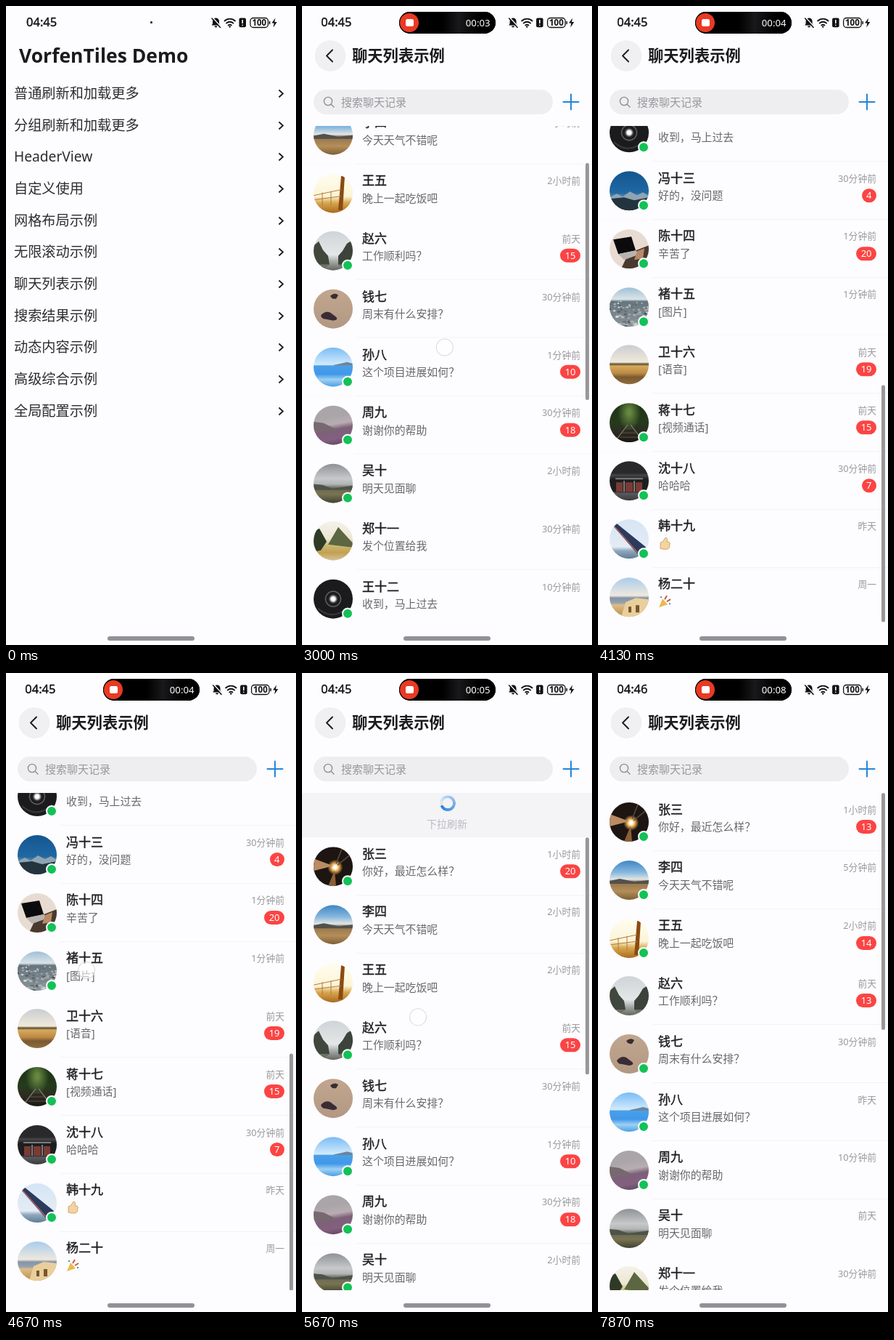
Animation of 400x879 px, one loop 8 s. Source, as an HTML page:

```html
<!DOCTYPE html>
<html lang="zh-CN">
<head>
<meta charset="utf-8">
<title>Chat list</title>
<style>
html, body { margin: 0; width: 100%; height: 100%; overflow: hidden; background: #fdfcfe; }
body { font-family: "Noto Sans", "Noto Sans CJK SC", "Noto Sans CJK", sans-serif; }
div { position: absolute; box-sizing: border-box; }
svg { position: absolute; left: 0; top: 0; overflow: visible; }
#stage { width: 400px; height: 879px; overflow: hidden; background: #fdfcfe; }
.fill { inset: 0; }
.text { line-height: 30px; white-space: nowrap; }
.mid { -webkit-text-stroke: .4px; }
.row { left: 0; width: 400px; height: 80px; background: #fdfcfe; }
.line { left: 75px; right: 0; bottom: 0; height: 1px; background: #f3f2f5; }
.row:last-child .line { display: none; }
.face { left: 16px; top: 13px; width: 54px; height: 54px; border-radius: 50%; overflow: hidden; }
.online { left: 55px; top: 52px; width: 16px; height: 16px; border-radius: 50%; background: #12c257; border: 2px solid #fff; }
.badge { right: 16px; top: 37px; height: 19px; padding: 0 6.5px; border-radius: 10px; background: #fb4444; color: #fff; font-size: 13px; line-height: 19px; }
.spin { left: 189.5px; width: 22px; height: 22px; border-radius: 50%; -webkit-mask: radial-gradient(circle, #0000 6.6px, #000 7.4px); mask: radial-gradient(circle, #0000 6.6px, #000 7.4px); }
.touch { width: 24px; height: 24px; margin: -12px; border-radius: 50%; background: #ffffff99; border: 1.5px solid #b8b8be88; }
</style>
</head>
<body>
<div id="stage"></div>
<script>
const LOOP = 8000, PUSH = 1316, LOADED = 2130, RELEASE = 5800, REFRESHED = 6780;
const TOP = 165, VIEW = 684, PITCH = 79.8;

const menu = ['普通刷新和加载更多', '分组刷新和加载更多', 'HeaderView', '自定义使用', '网格布局示例', '无限滚动示例',
  '聊天列表示例', '搜索结果示例', '动态内容示例', '高级综合示例', '全局配置示例'];

const thumb = '<svg width="18" height="18" style="top:6px"><path d="M3 8l3-1 4-6q4 0 2 6h3q2 1 1 4 0 5-3 6H7l-4-1z" fill="#f3d3a0" stroke="#c79a5c" stroke-width=".8"/></svg>';
const party = '<svg width="18" height="18" style="top:6px"><path d="M1 17L6 5l7 8z" fill="#edb94f"/><path d="M9 6l3-5M12 9l5-3" stroke="#c4593f" stroke-width="2"/><path d="M3 3h2M15 12h2" stroke="#4b86c9" stroke-width="2"/></svg>';

// name, message, then time / unread / online before and after the refresh
const chats = [
  ['张三', '你好，最近怎么样？', ['1小时前', 20, 1], ['1小时前', 13, 1]],
  ['李四', '今天天气不错呢', ['2小时前', 0, 0], ['5分钟前', 0, 1]],
  ['王五', '晚上一起吃饭吧', ['2小时前', 0, 0], ['2小时前', 14, 1]],
  ['赵六', '工作顺利吗？', ['前天', 15, 1], ['前天', 13, 0]],
  ['钱七', '周末有什么安排？', ['30分钟前', 0, 0], ['30分钟前', 0, 1]],
  ['孙八', '这个项目进展如何？', ['1分钟前', 10, 1], ['昨天', 0, 1]],
  ['周九', '谢谢你的帮助', ['30分钟前', 18, 1], ['10分钟前', 0, 1]],
  ['吴十', '明天见面聊', ['2小时前', 0, 1], ['前天', 0, 0]],
  ['郑十一', '发个位置给我', ['30分钟前', 0, 0]],
  ['王十二', '收到，马上过去', ['10分钟前', 0, 1]],
  ['冯十三', '好的，没问题', ['30分钟前', 4, 1]],
  ['陈十四', '辛苦了', ['1分钟前', 20, 1]],
  ['褚十五', '[图片]', ['1分钟前', 0, 1]],
  ['卫十六', '[语音]', ['前天', 19, 0]],
  ['蒋十七', '[视频通话]', ['前天', 15, 1]],
  ['沈十八', '哈哈哈', ['30分钟前', 7, 1]],
  ['韩十九', thumb, ['昨天', 0, 1]],
  ['杨二十', party, ['周一', 0, 0]]
];

const area = (color, d) => `<path d="${d}" fill="${color}"/>`;
const stroke = (color, width, d) => `<path d="${d}" stroke="${color}" stroke-width="${width}" fill="none"/>`;

function pebbles() {
  let seed = 7, out = '';
  const rnd = () => (seed = seed * 16807 % 2147483647) / 2147483647;
  for (let i = 0; i < 90; i++) {
    const y = 19 + 35 * rnd(), tone = 70 + 150 * rnd() | 0;
    out += `<ellipse cx="${54 * rnd()}" cy="${y}" rx="${y / 16}" ry="${y / 26}" fill="rgb(${tone},${tone + 6},${tone + 10})"/>`;
  }
  return out;
}

// avatar scenes: backdrop, shapes in a 54 x 54 box
const faces = [
  ['radial-gradient(circle at 55% 52%,#fff 5%,#f7b75a 12%,#0000 26%),#1d1512',
    area('#b98c62', 'M0 16L27 26L0 33z') + area('#8a6038', 'M29 32L20 54H31z') + stroke('#5b4a3d', 1.5, 'M54 8L33 25M40 0L31 23')],
  ['linear-gradient(#3f86c4,#86b7de 30%,#e3e6e2 48%,#7f7568 54%,#9a7a50 60%,#b48e58 78%,#7d6038)',
    area('#54504c', 'M0 28L14 25L34 29L54 27V32H0z')],
  ['linear-gradient(#fffdf0,#fcf4d6 58%,#d8a850 74%,#a96a1e)',
    area('#8a4a12', 'M38 3L43 3L40 50L34 50z') + stroke('#b27b3a', 1, 'M0 30L38 22M0 36L38 31M12 26V44M24 24V44')],
  ['linear-gradient(#ced4d8,#e4e7e8 60%,#a4a8a4 78%,#63665e)',
    area('#40483e', 'M0 20L7 14L13 26L20 34L22 46H0z') + area('#3b433a', 'M54 12L46 17L40 27L34 34L34 46H54z') + area('#6d7068', 'M0 46H22L12 54H0zM34 46H54V54H42z')],
  ['linear-gradient(#c2a68f,#b29883)',
    area('#3a2c34', 'M10 36q6-7 13-4l8 6q4 4-4 5l-10-2q-6 0-7-5zM23 9q6-5 11-1l-3 5q-6 1-8-4z')],
  ['linear-gradient(#79bcf6,#d3ebfb 44%,#4a9fe8 47%,#3f98ea 68%,#9fd0f2 82%,#4aa0e6)',
    area('#6a84a0', 'M28 24L38 22L46 20L54 22V25H28z')],
  ['linear-gradient(170deg,#a9a5a8 30%,#b9adb2 48%,#7d6078 60%,#83607f 80%,#554059)',
    area('#77696f', 'M0 22L14 24L34 34L0 36z')],
  ['linear-gradient(#8f9294,#c6c8ca 38%,#b3b6b7 52%,#67695a 62%,#7a7350 78%,#3f4232)',
    area('#4d5347', 'M0 28L12 29L26 34L54 30V36H0z')],
  ['linear-gradient(#f5f2e8,#ebe6d2 45%,#c7b977 62%,#c4a04e 80%,#d2c29a)',
    area('#2f3a26', 'M0 14L8 10L18 28L10 40L0 42z') + area('#5c6640', 'M20 32L34 8L54 30V36z')],
  ['radial-gradient(circle,#fff 7%,#999 11%,#222 16%,#1a1a1c 24%,#6a6a6c 27%,#1b1b1e 31%)',
    stroke('#39393c', 2, 'M6 40Q27 58 48 38')],
  ['linear-gradient(#14568f,#2068a4 55%,#4a7ea6 62%,#20303c 70%,#1b2730)',
    area('#8fa4b3', 'M0 36L10 31L18 35L28 28L38 33L46 29L54 34V40H0z') + area('#24343f', 'M0 38L20 36L34 40L54 36V54H0z')],
  ['#e8dcd2',
    area('#49392f', 'M26 33L54 22V54H16z') + area('#0b0b0d', 'M5 14L30 10L36 29L12 34z') + area('#b9b3b0', 'M12 34L36 29L42 34L20 42z') + area('#b98a68', 'M38 30L48 26L46 40L34 42z')],
  ['linear-gradient(#9fc0d8,#dbe4e8 30%,#66757e 36%,#8a959b)', pebbles()],
  ['linear-gradient(#c9cdd0,#f1e9db 44%,#5b5338 49%,#d8a95a 54%,#bb8a46 72%,#7a5a30 82%,#8f6c3c)',
    ''],
  ['radial-gradient(ellipse at 50% 24%,#66873f 6%,#0000 42%),linear-gradient(#1c3316,#263a1d 50%,#2d2a20 75%,#1b1612)',
    stroke('#77786c', 1.3, 'M25 30L8 52M29 30L46 52') + stroke('#4c4238', 1.5, 'M22 35h10M18 41h18M14 47h26')],
  ['linear-gradient(#29282b 30%,#454548 36%,#1e1d1f 46%,#1e1d1f 76%,#5a5a5e 82%,#3a393c)',
    area('#7a3b33', 'M9 29h9v13h-9zM22 29h10v13h-10zM36 29h9v13h-9z') + area('#7b7c80', 'M8 23h38v2h-38zM19 27h2v15h-2zM33 27h2v15h-2z')],
  ['linear-gradient(#d5e5f5,#e4ecf5 70%,#8fa8bc 80%,#5f7d94)',
    area('#2c3a5c', 'M5 9L9 5L50 38L39 48z') + stroke('#b5605a', 1.5, 'M7 10L40 47')],
  ['linear-gradient(#a9cdec,#efe8de 46%,#8494a6 52%,#93a0ae 64%,#dcbd88 70%,#b98d4c)',
    area('#e9cf9c', 'M22 34L36 28L54 30V54H16z') + area('#7a5630', 'M26 40h4v8h-4zM36 38h5v10h-5z')]
];

// motion tracks: [time, value]
const scrollTrack = [[2870, 0], [2960, 60], [3100, 250], [3300, 470], [3500, 610], [3670, 679], [3900, 729], [4200, 751], [4450, 753],
  [4680, 753], [4780, 640], [4900, 420], [5050, 200], [5200, 65], [5350, 0]];
const pullTrack = [[5420, 0], [5540, 30], [5670, 61], [5790, 78], [5950, 69], [REFRESHED, 69], [6900, 28], [7060, 0]];
const touches = [
  [[[2870, 190], [3080, 200]], [[2870, 640], [3080, 390]]],
  [[[4600, 110], [4670, 111], [4850, 122]], [[4600, 409], [4670, 409], [4850, 640]]],
  [[[5400, 152], [5670, 160], [RELEASE, 162]], [[5400, 330], [5670, 473], [RELEASE, 510]]]
];

// monotone cubic through the points
function at(track, t) {
  const n = track.length - 1;
  if (t <= track[0][0]) return track[0][1];
  if (t >= track[n][0]) return track[n][1];
  const slope = i => i < 0 || i >= n ? 0 : (track[i + 1][1] - track[i][1]) / (track[i + 1][0] - track[i][0]);
  const tangent = i => {
    const a = slope(i - 1), b = slope(i);
    return a * b > 0 ? 2 * a * b / (a + b) : 0;
  };
  const i = track.findIndex(p => p[0] > t) - 1;
  const [t0, v0] = track[i], [t1, v1] = track[i + 1], d = t1 - t0, u = (t - t0) / d;
  return v0 + (v1 - v0) * u * u * (3 - 2 * u) + d * u * (1 - u) * ((1 - u) * tangent(i) - u * tangent(i + 1));
}

// what is left of a critically damped spring
function rest(ms, omega) {
  const x = Math.max(0, ms) / 1000 * omega;
  return (1 + x) * Math.exp(-x);
}

function box(parent, cls, css = '', html = '') {
  const e = document.createElement('div');
  e.className = cls;
  e.style.cssText = css;
  e.innerHTML = html;
  parent.append(e);
  return e;
}
const text = (parent, str, x, y, size, color, css = '', cls = '') =>
  box(parent, 'text ' + cls, `left:${x}px;top:${y - 15}px;font-size:${size}px;color:${color};${css}`, str);
const centered = 'width:400px;text-align:center;';
const svg = (parent, body) => box(parent, '', 'left:0;top:0', `<svg width="400" height="160" fill="none" stroke-linecap="round" stroke-linejoin="round">${body}</svg>`);

const stage = document.getElementById('stage');

// menu page
const home = box(stage, 'fill');
text(home, 'VorfenTiles Demo', 18, 68, 26.5, '#1b1b1d', 'font-weight:700');
menu.forEach((label, i) => {
  const y = 120 + 43.65 * i;
  text(home, label, 11, y, 19.2, '#2d2d30');
  box(home, '', `left:0;top:${y}px`, '<svg width="400" height="9" fill="none"><path d="M376.5 -4.5L382 .5L376.5 5.5" stroke="#151517" stroke-width="1.7"/></svg>');
});
const shade = box(stage, 'fill', 'background:#000');

// chat page
const page = box(stage, 'fill', 'background:#fdfcfe');
const body = box(page, 'fill');
const head = box(page, '', 'left:0;top:0');
svg(head, '<circle cx="39" cy="68.5" r="21.3" fill="#f0eff2"/><path d="M42 60.5L34 68.5L42 76.5" stroke="#1b1b1d" stroke-width="1.9"/>');
text(head, '聊天列表示例', 69, 68, 21.3, '#1b1b1d', 'font-weight:700');
box(body, '', 'left:16px;top:115px;width:330px;height:34px;border-radius:17px;background:#eeedef');
svg(body, '<circle cx="36" cy="131" r="5.6" stroke="#8f8f94" stroke-width="1.4"/><path d="M40.2 135.2L44 139" stroke="#8f8f94" stroke-width="1.4"/><path d="M360.5 132h21M371 121.5v21" stroke="#2586d8" stroke-width="2"/>');
text(body, '搜索聊天记录', 54, 131.5, 15, '#98989d');

const view = box(body, '', `left:0;top:${TOP}px;width:400px;height:${VIEW}px;overflow:hidden;background:#f4f3f6`);
const loader = box(view, 'fill');
box(loader, '', 'left:192.5px;top:319.5px;width:19px;height:19px;border-radius:50%;border:1.7px solid #b3b3b8');
const moon = box(loader, '', 'left:200px;top:327px;width:4px;height:4px;border-radius:50%;background:#d2d2d6');
text(loader, '数据加载中...', 0, 360, 14.6, '#98989d', centered);

const header = box(view, '', 'left:0;top:0;width:400px');
const spinner = box(header, 'spin', 'top:-58px');
const hint = text(header, '', 0, -18, 14, '#bcbcc1', centered);

const list = box(view, '', 'left:0;top:0');
const rows = chats.map(([name, msg, before, after = before], i) => {
  const row = box(list, 'row', `top:${i * PITCH}px`);
  const [backdrop, shapes] = faces[i];
  box(row, 'line');
  box(row, 'face', 'background:' + backdrop, `<svg width="54" height="54">${shapes}</svg>`);
  text(row, name, 83, 22.5, 17, '#1f1f22', '', 'mid');
  text(row, msg, 83, 46, 14.9, '#68686c');
  const time = text(row, '', 0, 22.5, 12.8, '#99999e', 'left:auto;right:16px');
  const badge = box(row, 'badge'), dot = box(row, 'online');
  return fresh => {
    const [when, unread, online] = fresh ? after : before;
    time.textContent = when;
    badge.textContent = unread;
    badge.hidden = !unread;
    dot.hidden = !online;
  };
});
const bar = box(view, '', 'left:391px;top:0;width:4.5px;height:326px;border-radius:3px;background:#97979c');

// status bar
const clock = text(stage, '', 28, 22, 16.5, '#121214', '', 'mid');
const icons = svg(stage, `
  <path d="M289.5 16.5c-3 0-4.5 2-4.5 5v3l-1.5 2h12l-1.5-2v-3c0-3-1.5-5-4.5-5zM287.5 27.5h4a2 2 0 0 1-4 0z" fill="#111"/>
  <path d="M285 16l11.5 12.5" stroke="#fdfcfe" stroke-width="1.5"/><path d="M284 17l11.5 12.5" stroke="#111" stroke-width="1.5"/>
  <path d="M301.5 20.5a10.5 10.5 0 0 1 14.5 0M304 23.6a7 7 0 0 1 9.5 0M306.6 26.5a3.4 3.4 0 0 1 4.3 0" stroke="#111" stroke-width="1.8"/><circle cx="308.7" cy="28.5" r="1.2" fill="#111"/>
  <rect x="321.5" y="16.5" width="9.5" height="12.8" rx="2" fill="#111"/><path d="M326.2 19.5v4M326.2 26.3v.1" stroke="#fff" stroke-width="1.6"/>
  <rect x="337" y="16.5" width="24.5" height="13" rx="4" stroke="#111" stroke-width="1.3"/><path d="M363.6 21.5v3" stroke="#111" stroke-width="1.5"/>
  <text x="349.3" y="27.3" font-size="11.5" font-weight="700" text-anchor="middle" fill="#111">100</text>
  <path d="M371.5 16.5l-5 7h3.2l-1 6 5-7.5h-3.3z" fill="#111"/>`);
const island = box(stage, '', 'overflow:hidden;background:#000');
const record = box(island, 'fill', 'background:linear-gradient(90deg,#000 45%,#19191b 62%,#000 82%)');
box(record, '', 'left:1.5px;top:2px;width:26px;height:26px;border-radius:50%;background:#e93a24');
box(record, '', 'left:9px;top:10px;width:11px;height:10.5px;border-radius:2.5px;background:#fff');
const timer = text(record, '', 92, 15, 13.2, '#fff');
box(stage, '', 'left:140px;top:867px;width:120px;height:5.5px;border-radius:3px;background:#919196');
const finger = box(stage, 'touch');

const shift = (e, x, y = 0) => { e.style.transform = `translate(${x}px,${y}px)`; };
function label(e, str) { if (e.textContent !== str) e.textContent = str; }

let shownFresh = null;
function draw(t) {
  // recording pill
  const grow = 1 - rest(t - 90, 14);
  const w = 3 + 130 * grow, h = 3 + 27 * grow;
  Object.assign(island.style, { left: 200.3 - w / 2 + 'px', top: 22.8 - h / 2 + 'px', width: w + 'px', height: h + 'px', borderRadius: h / 2 + 'px' });
  record.style.opacity = Math.min(1, Math.max(0, (t - 330) / 250));
  label(timer, '00:0' + Math.floor((t + 135) / 1000));
  label(clock, t < 6000 ? '04:45' : '04:46');
  shift(clock, -1.7 * grow);
  shift(icons, 1.6 * grow);

  // page push
  const r = rest(t - PUSH, 18.5);
  shift(home, -80 * (1 - r));
  shade.style.opacity = 0.1 * (1 - r);
  page.style.clipPath = `inset(0 0 0 ${400 * r}px)`;
  shift(head, 400 * r);
  shift(body, 200 * r);

  // first load
  const loaded = t >= LOADED;
  loader.hidden = loaded;
  list.hidden = bar.hidden = header.hidden = !loaded;
  const a = t / 1200 * 2 * Math.PI;
  shift(moon, 11 * Math.cos(a), 5 * Math.sin(a) - 4 * Math.cos(a));

  // list, refresh header and scroll bar
  const scroll = at(scrollTrack, t), pull = at(pullTrack, t);
  shift(list, 0, pull - scroll);
  shift(bar, 0, pull + scroll * VIEW / (PITCH * chats.length));
  shift(header, 0, pull);
  if (t < RELEASE) {
    const p = Math.min(100, pull / 69 * 100);
    label(hint, pull < 69 ? '下拉刷新' : '释放刷新');
    spinner.style.background = `conic-gradient(from 290deg,#cfe2f6,#2480dc ${p}%,#e4e4ea ${p}%)`;
  } else {
    label(hint, '刷新中...');
    spinner.style.background = `conic-gradient(from ${130 + (t - 6470) * 0.36}deg,#e4e4ea 65%,#2f86dc)`;
  }
  const fresh = t >= REFRESHED;
  if (fresh !== shownFresh) {
    rows.forEach(update => update(fresh));
    shownFresh = fresh;
  }

  // finger
  const touch = touches.find(([x]) => t >= x[0][0] && t <= x[x.length - 1][0]);
  finger.hidden = !touch;
  if (touch) shift(finger, at(touch[0], t), at(touch[1], t));
}

const start = performance.now();
function tick() {
  draw((performance.now() - start) % LOOP);
  requestAnimationFrame(tick);
}
tick();
</script>
</body>
</html>
```
